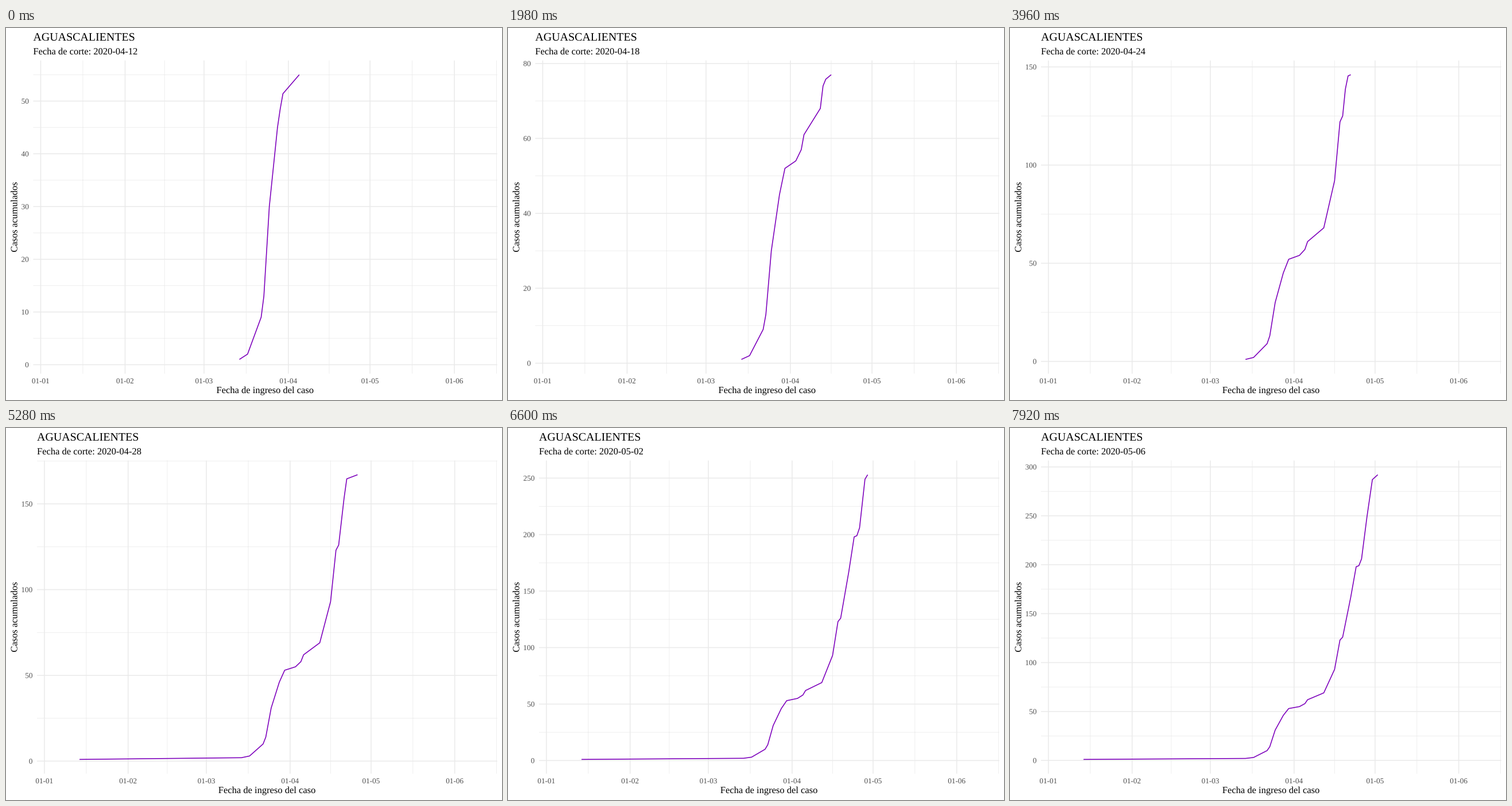
Write a matplotlib script that moves like this. It is 864 px wide and 648 px high and loops after 8000 ms.

```python
import numpy as np
import matplotlib.pyplot as plt
from matplotlib.animation import FuncAnimation
from matplotlib.patheffects import Normal

plt.rcParams.update({
    "font.family": "Liberation Serif",
    "text.kerning_factor": 6,
    "path.simplify": False,
})

W, H, DPI = 864, 648, 108
STEP, FRAMES = 40, 200          # ms per frame, frames per loop
HOLD = 330                      # ms per cut-off date
TOP, BOTTOM, RIGHT = 56.6, 602.1, 855.75
GRID, INK, TICK = "#EBEBEB", "black", "#4D4D4D"

MONTHS = np.array([0, 31, 60, 91, 121, 152])    # days since 1 January
MID_MONTHS = np.append((MONTHS[1:] + MONTHS[:-1]) / 2, 167.5)
SPAN, LEAD = 170.5, 2.75        # days across the panel, days before 1 January

# Bends of the fully reported curve: day, cumulative cases
FIRST_DAY = 73
BENDS = np.transpose([
    (FIRST_DAY, 1), (76, 2), (81, 9), (82, 13), (84, 30), (87, 45), (89, 52),
    (93, 54), (95, 57), (96, 61), (102, 68), (106, 92), (108, 122),
    (109, 125), (112, 166), (114, 197), (115, 198), (116, 205), (118, 248),
    (120, 286), (122, 291)])

# End of the reported curve: cut-off date, last day, last value
TIPS = np.transpose([
    (0, 95, 55), (5, 106, 77), (10, 112, 100), (12, 112, 146),
    (16, 116, 166), (20, 119, 252), (24, 122, 291)])
LATE_SLOPE = 0.6                # cases per day while reports are still due
QUIET = {1, 3, 6, 8, 9}         # dates without new reports
JANUARY_CASE = 16               # from this date on, one case of 14 January


def curve(k):
    """Known cases per day: the full curve, flattened where reports lag."""
    while k in QUIET:
        k -= 1
    last = round(np.interp(k, TIPS[0], TIPS[1]))
    total = np.interp(k, TIPS[0], TIPS[2])
    days = np.arange(FIRST_DAY, last + 1)
    cases = np.minimum(np.interp(days, *BENDS),
                       total - LATE_SLOPE * (last - days))
    if k >= JANUARY_CASE:
        days, cases = np.append(13, days), np.append(1, cases + 1)
    return days, cases


def break_step(span):
    return 10 if span <= 70 else 20 if span <= 140 else 50


def segments(xs, ys, left):
    """Vertical lines at xs and horizontal lines at ys, as one broken path."""
    px, py = [], []
    for y in ys:
        px += [left, RIGHT, np.nan]
        py += [y, y, np.nan]
    for x in xs:
        px += [x, x, np.nan]
        py += [TOP, BOTTOM, np.nan]
    return px, py


fig = plt.figure(figsize=(W / DPI, H / DPI), dpi=DPI, facecolor="white")
ax = fig.add_axes([0, 0, 1, 1])
ax.set(xlim=(0, W), ylim=(H, 0))
ax.axis("off")


def stroke(color, px):
    line, = ax.plot([], [], color=color, lw=px * 72 / DPI, snap=False,
                    solid_capstyle="butt", solid_joinstyle="round")
    return line


def label(x, y, text, size, color=INK, **kw):
    # The path effect draws outlines, so text sits at fractions of a pixel
    return ax.text(x, y, text, fontsize=size, color=color, va="baseline",
                   path_effects=[Normal()], **kw)


minor, major = stroke(GRID, 0.8), stroke(GRID, 1.6)
line = stroke("#7D00BC", 1.6)
title = label(0, 22, "AGUASCALIENTES", 13.3)
subtitle = label(0, 46, "", 11)
x_title = label(0, 636, "Fecha de ingreso del caso", 11, ha="center")
label(19.5, (TOP + BOTTOM) / 2, "Casos acumulados", 11, ha="center",
      rotation=90, rotation_mode="anchor")
x_ticks = [label(0, 619, f"01-{m:02d}", 8.8, TICK, ha="center")
           for m in range(1, 7)]
y_ticks = [label(0, 0, "", 8.8, TICK, ha="right") for _ in range(8)]


def draw(i):
    k = (i * STEP + 30) // HOLD
    days, cases = curve(k)
    span = cases.max() - cases.min()
    low, high = cases.min() - 0.05 * span, cases.max() + 0.05 * span
    step = break_step(span)
    breaks = np.arange(0, high, step)
    halves = np.arange(step / 2, high, step)

    left = 47.4 if breaks[-1] < 100 else 54.0
    per_day = (RIGHT - left) / SPAN

    def to_x(d):
        return left + (np.asarray(d) + LEAD) * per_day

    def to_y(v):
        return BOTTOM - (np.asarray(v) - low) * (BOTTOM - TOP) / (high - low)

    minor.set_data(*segments(to_x(MID_MONTHS), to_y(halves), left))
    major.set_data(*segments(to_x(MONTHS), to_y(breaks), left))
    line.set_data(to_x(days), to_y(cases))

    title.set_x(left)
    subtitle.set_x(left)
    day = 12 + k
    date = f"04-{day:02d}" if day <= 30 else f"05-{day - 30:02d}"
    subtitle.set_text(f"Fecha de corte: 2020-{date}")
    x_title.set_x((left + RIGHT) / 2)
    for t, x in zip(x_ticks, to_x(MONTHS)):
        t.set_x(x)
    for n, t in enumerate(y_ticks):
        shown = n < len(breaks)
        t.set_text(f"{breaks[n]:.0f}" if shown else "")
        if shown:
            t.set_position((left - 7.6, to_y(breaks[n]) + 4.5))
    return []


anim = FuncAnimation(fig, draw, frames=FRAMES, interval=STEP,
                     init_func=lambda: draw(0), repeat=True, repeat_delay=0)
plt.show()
```
